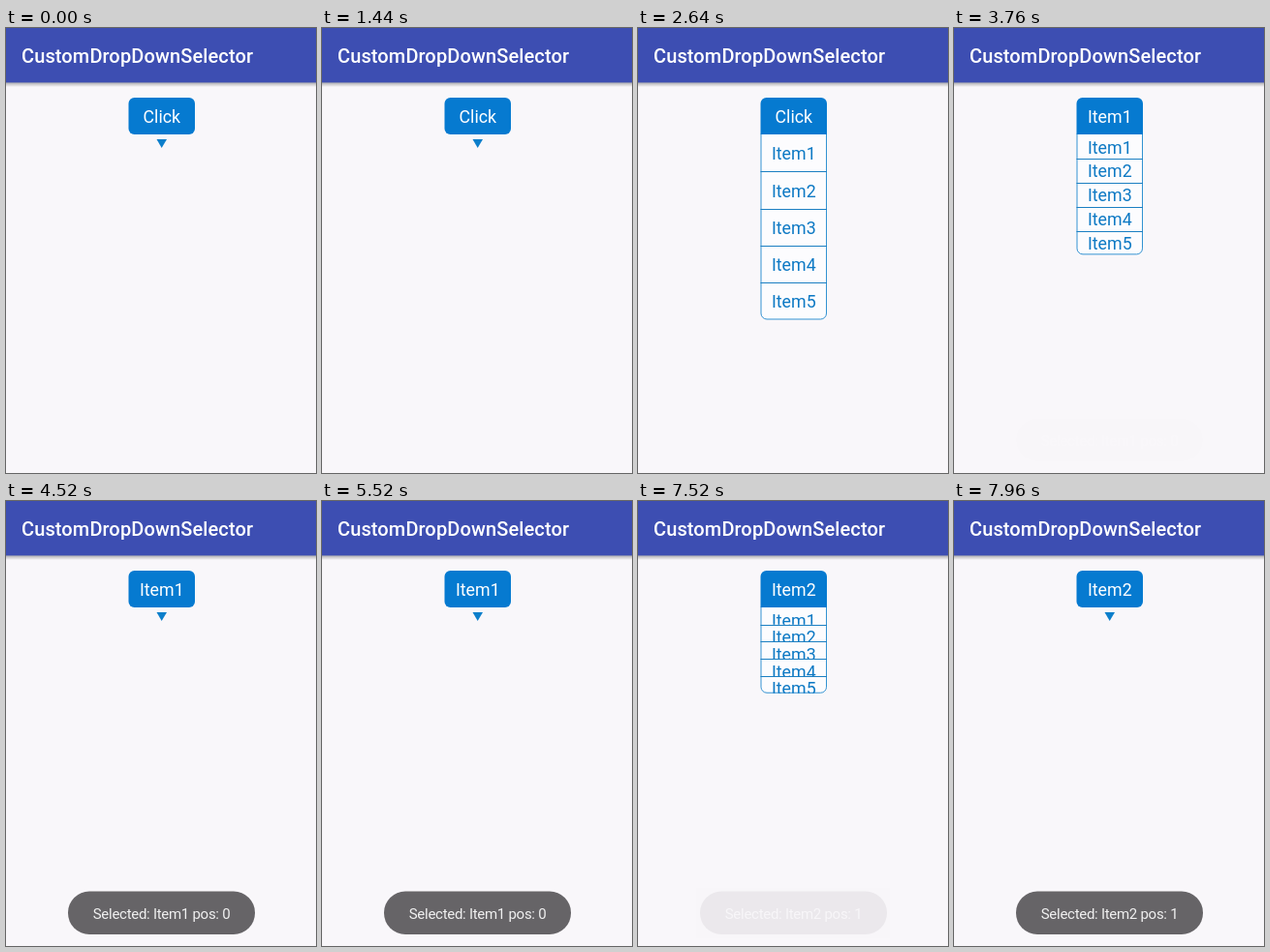
Recreate the animation shown at these times as an HTML page with a canvas. Size 320 px wide and 460 px high, loop 8000 ms.

```html
<!DOCTYPE html>
<html lang="en">
<head>
<meta charset="utf-8">
<title>Drop-down selector</title>
<style>
html, body { margin: 0; width: 100%; height: 100%; overflow: hidden; background: #f9f7fa; }
canvas { display: block; }
</style>
</head>
<body>
<canvas id="stage" width="320" height="460"></canvas>
<script>
const ctx = document.getElementById('stage').getContext('2d');
const LOOP = 8000, PAGE = '#f9f7fa', BLUE = '#067ad0', LINE = '#1b7fc2', BORDER = '#3392d2';
const LEFT = 126.5, WIDTH = 68.5, HEAD_TOP = 72, LIST_TOP = 110, ROW = 38.3, MIDDLE = 160.8;
const LABEL_SIZE = 17.8;

// Each round: list opens, an item is picked (list closes), a toast follows.
const rounds = [
  { open: 1500, pick: 3640, label: 'Item1', toast: 'Selected: Item1 pos: 0' },
  { open: 5540, pick: 7364, label: 'Item2', toast: 'Selected: Item2 pos: 1' }
];

const ramp = (t, start, length) => Math.min(1, Math.max(0, (t - start) / length));
const ease = u => (1 - Math.cos(Math.PI * u)) / 2;

function shape(x, y, w, h, radii) {
  ctx.beginPath();
  ctx.roundRect(x, y, w, h, radii);
}

function text(str, x, y, size, color, { weight = 400, align = 'center', spacing = 0 } = {}) {
  ctx.font = `${weight} ${size}px Roboto, sans-serif`;
  ctx.letterSpacing = spacing + 'px';
  ctx.textAlign = align;
  ctx.fillStyle = color;
  ctx.fillText(str, x, y);
}

function drawBar() {
  const shadow = ctx.createLinearGradient(0, 56, 0, 61);
  shadow.addColorStop(0, 'rgba(0,0,0,.32)');
  shadow.addColorStop(1, 'rgba(0,0,0,0)');
  ctx.fillStyle = shadow;
  ctx.fillRect(0, 56, 320, 5);
  ctx.fillStyle = '#3d4eb2';
  ctx.fillRect(0, 0, 320, 56.4);
  text('CustomDropDownSelector', 16, 36, 20, '#fff', { weight: 500, align: 'left', spacing: .12 });
}

function drawHead(label, isOpen) {
  ctx.fillStyle = BLUE;
  shape(LEFT, HEAD_TOP, WIDTH, 38, isOpen ? [6, 6, 0, 0] : 6);
  ctx.fill();
  text(label, MIDDLE, 97.5, LABEL_SIZE, '#fff');
  if (isOpen) return;
  ctx.fillStyle = '#0d7fcb';
  ctx.beginPath();
  ctx.moveTo(155.5, 115);
  ctx.lineTo(166, 115);
  ctx.lineTo(160.7, 124);
  ctx.fill();
}

function drawList(amount) {
  const row = ROW * amount;
  shape(LEFT + .5, LIST_TOP - .5, WIDTH - 1, row * 5, [0, 0, 6, 6]);
  ctx.fillStyle = '#fcfcfe';
  ctx.fill();
  ctx.strokeStyle = BORDER;
  ctx.lineWidth = 1;
  ctx.stroke();
  for (let i = 0; i < 5; i++) {
    const top = LIST_TOP + row * i;
    ctx.save();
    ctx.beginPath();
    ctx.rect(LEFT, top, WIDTH, row);
    ctx.clip();
    text('Item' + (i + 1), MIDDLE, top + Math.max(row / 2, 12.4) + 7.1, LABEL_SIZE, '#0d79c4');
    ctx.restore();
    if (i) {
      ctx.fillStyle = LINE;
      ctx.fillRect(LEFT, Math.round(top), WIDTH, 1);
    }
  }
}

// Box and message fade as one layer: drawn solid, then veiled by the page colour.
function drawToast(message, alpha) {
  ctx.fillStyle = '#666467';
  shape(64, 403.5, 193, 44.5, 22);
  ctx.fill();
  text(message, 160.5, 432, 15, '#f0f0f0', { spacing: -.28 });
  ctx.globalAlpha = 1 - alpha;
  ctx.fillStyle = PAGE;
  ctx.fillRect(60, 400, 200, 52);
  ctx.globalAlpha = 1;
}

function draw(t) {
  ctx.fillStyle = PAGE;
  ctx.fillRect(0, 0, 320, 460);
  drawBar();

  let label = 'Click', amount = 0;
  for (const r of rounds) {
    if (t >= r.pick) label = r.label;
    amount += ease(ramp(t, r.open, 300)) - ease(ramp(t, r.pick, 300));
  }
  const isOpen = amount > .005;
  if (isOpen) drawList(amount);
  drawHead(label, isOpen);

  for (const r of rounds) {
    const alpha = ramp(t, r.pick + 120, 400) - ramp(t, r.pick + 2150, 400);
    if (alpha > 0) drawToast(r.toast, alpha);
  }
}

function tick(now) {
  draw(now % LOOP);
  requestAnimationFrame(tick);
}
requestAnimationFrame(tick);
</script>
</body>
</html>
```
